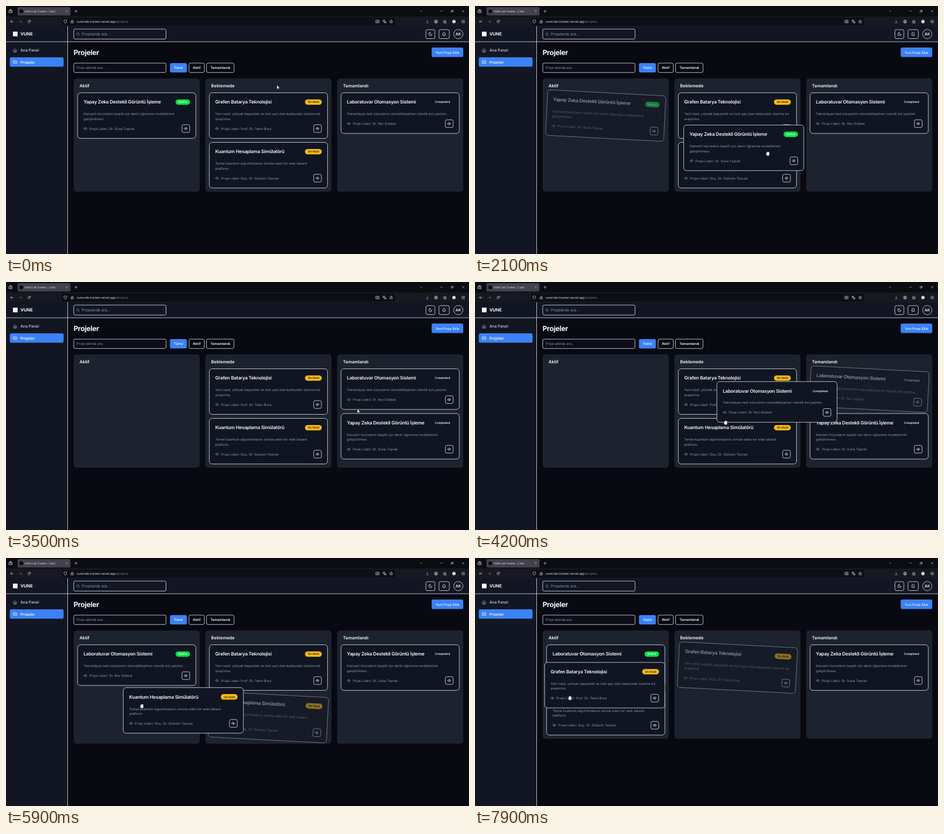
Write an HTML page that moves like this. It is 800 by 430 pixels and loops after 8000 ms.

```html
<!DOCTYPE html>
<html lang="tr">
<head>
<meta charset="utf-8">
<title>Projeler</title>
<style>
html, body { margin: 0; width: 100%; height: 100%; overflow: hidden; background: #090912; }
svg { display: block; width: 100%; height: 100%; }
text { font-family: Inter, sans-serif; text-rendering: geometricPrecision; white-space: pre; }
.ui { font-family: "Open Sans", sans-serif; }
.tight { letter-spacing: -.025em; }
</style>
</head>
<body>
<svg viewBox="0 0 800 430"><g id="page"></g><g id="board"></g></svg>
<script>
const LIGHT = '#f5f7fb', MUTED = '#8b96a9', LINE = '#dfe3ea', BLUE = '#3b82f6';
const PANEL = '#121623', CARD = '#111521', COLUMN = '#1d232e';

const ICONS = {
  eye: 'M2 12s3.6-7 10-7 10 7 10 7-3.6 7-10 7-10-7-10-7ZM15 12a3 3 0 1 1-6 0 3 3 0 0 1 6 0',
  moon: 'M12 3a6 6 0 0 0 9 9 9 9 0 1 1-9-9Z',
  bell: 'M6 8a6 6 0 0 1 12 0c0 7 3 9 3 9H3s3-2 3-9M10.3 21a2 2 0 0 0 3.4 0',
  home: 'm3 9 9-7 9 7v11a2 2 0 0 1-2 2H5a2 2 0 0 1-2-2zM9 22V12h6v10',
  folder: 'M4 20h16a2 2 0 0 0 2-2V8a2 2 0 0 0-2-2h-8l-2-3H4a2 2 0 0 0-2 2v13a2 2 0 0 0 2 2ZM8 10v4M12 10v2M16 10v6',
  search: 'M21 21l-4.3-4.3M19 11a8 8 0 1 1-16 0 8 8 0 0 1 16 0',
  back: 'M21 12H4M11 5l-7 7 7 7',
  forward: 'M3 12h17M13 5l7 7-7 7',
  reload: 'M20 12a8 8 0 1 1-3-6.2L20 8M20 2v6h-6',
  shield: 'M12 2l9 3c0 9-3 14-9 17-6-3-9-8-9-17z',
  lock: 'M5 11h14v10H5zM8 11V7a4 4 0 0 1 8 0v4',
  tabs: 'M3 9h18v12H3zM5 5h14M9 2h6M9 15h6',
  reader: 'M2 4h20v16H2zM12 7v10M8 12h8',
  translate: 'M2 5h12M8 2v3M12 5c-1 5-5 8-9 9M5 8c2 4 5 5 7 6M12 22l5-12 5 12M14 18h6',
  star: 'M12 2l3 7 7 .6-5.400 4.800 1.700 7.100L12 17.700 5.700 21.500l1.700-7.100L2 9.600 9 9z',
  download: 'M12 3v12M6 10l6 6 6-6M4 21h16',
  user: 'M22 12a10 10 0 1 1-20 0 10 10 0 0 1 20 0M16 10a4 4 0 1 1-8 0 4 4 0 0 1 8 0M6 19c2-4 10-4 12 0',
  puzzle: 'M4 8h5c-2-6 6-6 4 0h6v5c-6-2-6 6 0 4v4H4v-5c5 1 5-5 0-4z',
  menu: 'M3 5h18M3 12h18M3 19h18',
  down: 'M4 8l8 8 8-8',
  minus: 'M4 12h16',
  plus: 'M12 3v18M3 12h18',
  close: 'M4 4l16 16M20 4L4 20',
  restore: 'M4 8h12v12H4zM8 8V4h12v12h-4'
};

const rect = (x, y, w, h, r, fill, stroke = 'none') =>
  `<rect x="${x}" y="${y}" width="${w}" height="${h}" rx="${r}" fill="${fill}" stroke="${stroke}" stroke-width=".8"/>`;
const text = (x, y, size, str, fill = LIGHT, weight = 400, attrs = '') =>
  `<text x="${x}" y="${y}" font-size="${size}" fill="${fill}" font-weight="${weight}" ${attrs}>${str}</text>`;
const mid = 'text-anchor="middle"';
const icon = (name, cx, cy, size, color = LIGHT) =>
  `<path d="${ICONS[name]}" transform="translate(${cx - size / 2} ${cy - size / 2}) scale(${size / 24})" fill="none" stroke="${color}" stroke-width="2.2" stroke-linecap="round" stroke-linejoin="round"/>`;
const dot = (x, y, r, fill, stroke = 'none') =>
  `<circle cx="${x}" cy="${y}" r="${r}" fill="${fill}" stroke="${stroke}" stroke-width=".8"/>`;

function browser() {
  const bar = [['back', 10], ['forward', 25, '#777783'], ['reload', 40], ['shield', 102.5], ['lock', 114.5],
    ['reader', 642], ['translate', 654], ['star', 665.5], ['download', 728, '#4aa8f0'],
    ['user', 743], ['puzzle', 758.5], ['menu', 790]];
  const top = [['tabs', 8, 7], ['close', 105, 4], ['plus', 121, 6], ['down', 717.5, 5],
    ['minus', 752.5, 5], ['restore', 771, 5], ['close', 790, 5]];
  return rect(0, 0, 800, 18, 0, '#0c0c13') + rect(0, 18, 800, 17, 0, '#181821') +
    rect(20, 2, 91.5, 14.5, 2, '#42414d') + rect(97, 20, 575, 14, 2, '#0e0e16') +
    dot(26.5, 9.2, 3.2, '#08080c') +
    text(32, 11, 4.6, 'VUNE Lab Tracker | Canlı', LIGHT, 400, 'class="ui"') +
    text(122, 29, 5.35, 'vune-lab-tracker.vercel.app<tspan fill="#85858f">/projects</tspan>', LIGHT, 400, 'class="ui"') +
    top.map(([n, x, s]) => icon(n, x, 9, s)).join('') +
    bar.map(([n, x, c]) => icon(n, x, 27, 6.5, c)).join('') + dot(774, 27, 3, '#d4d4d8');
}

function shell() {
  const button = (x, w, label, fill, line) =>
    rect(x, 99, w, 16.3, 2.5, fill, line) + text(x + w / 2, 109.300, 5.83, label, LIGHT, 600, mid);
  return rect(0, 35, 800, 395, 0, '#090912') + rect(0, 35, 106.5, 395, 0, PANEL) + rect(106, 35, 694, 27, 0, PANEL) +
    rect(106, 35, .8, 395, 0, LINE) + rect(0, 61.6, 800, .8, 0, LINE) +
    rect(12, 44.5, 8, 8, 0, LIGHT) + text(25, 51.3, 7.5, 'VUNE', LIGHT, 700) +
    icon('home', 15.7, 77, 7, '#a9b2c2') + text(25, 79.4, 6.67, 'Ana Panel', '#d5dae3', 500) +
    rect(6.5, 89, 93, 16.3, 2.5, BLUE) + icon('folder', 15.7, 97, 7.5) + text(25, 99.5, 6.67, 'Projeler', LIGHT, 600) +
    rect(117, 40, 159.5, 17.3, 2.5, PANEL, LINE) + icon('search', 124.3, 48.700, 6.5, MUTED) +
    text(131, 51.2, 6.67, 'Projelerde ara...', MUTED) +
    rect(725.5, 41, 15.5, 15.5, 2.5, 'none', LINE) + icon('moon', 733.2, 48.7, 7.5) +
    rect(748, 41, 18, 15.5, 2.5, 'none', LINE) + icon('bell', 757, 48.7, 7.5) +
    dot(781.5, 48.7, 8, 'none', LINE) + text(781.5, 51.1, 6.67, 'AK', LIGHT, 600, mid) +
    text(116.7, 85, 12.3, 'Projeler', LIGHT, 700, 'class="tight"') +
    rect(735.5, 72, 54.5, 16.6, 2.5, BLUE) + text(762.8, 82.5, 5.83, 'Yeni Proje Ekle', LIGHT, 500, mid) +
    rect(117, 99, 159.5, 16.3, 2.5, '#0c0d17', LINE) + text(122, 109.3, 5.83, 'Proje adında ara...', MUTED) +
    button(283.3, 29.2, 'Tümü', BLUE) + button(316.2, 26.5, 'Aktif', 'none', LINE) +
    button(346.5, 47.5, 'Tamamlandı', 'none', LINE);
}

const CARDS = {
  vision: { h: 79, title: 'Yapay Zeka Destekli Görüntü İşleme', lead: 'Dr. Suna Toprak',
    lines: ['Kanserli hücrelerin tespiti için derin öğrenme modellerinin', 'geliştirilmesi.'] },
  battery: { h: 79, title: 'Grafen Batarya Teknolojisi', lead: 'Prof. Dr. Tekin Bora',
    lines: ['Yeni nesil, yüksek kapasiteli ve hızlı şarj olan bataryalar üzerine bir', 'araştırma.'] },
  quantum: { h: 79, title: 'Kuantum Hesaplama Simülatörü', lead: 'Doç. Dr. Gülsüm Tezcan',
    lines: ['Temel kuantum algoritmalarını simüle eden bir web tabanlı', 'platform.'] },
  lab: { h: 70.5, title: 'Laboratuvar Otomasyon Sistemi', lead: 'Dr. Nur Gökbel',
    lines: ['Tekrarlayan test süreçlerini otomatikleştiren robotik kol yazılımı.'] }
};
const COLUMNS = [['Aktif', 117], ['Beklemede', 344.6], ['Tamamlandı', 572.2]];
const BADGES = [['Active', 25, '#0be04b', '#f2fff5'], ['On Hold', 29, '#fbbc15', '#15130a'], ['Completed', 38, 'none', LIGHT]];

// Column contents from each moment on.
const BOARDS = [
  [0, ['vision'], ['battery', 'quantum'], ['lab']],
  [2440, [], ['battery', 'quantum'], ['lab', 'vision']],
  [4700, ['lab'], ['battery', 'quantum'], ['vision']],
  [6100, ['lab', 'quantum'], ['battery'], ['vision']]
];
const DRAGS = [
  { id: 'vision', grab: 1750, drop: 2440 },
  { id: 'lab', grab: 3600, drop: 4700 },
  { id: 'quantum', grab: 5450, drop: 6100 },
  { id: 'battery', grab: 7000, drop: 9000 }
];
// Pointer path: time, x, y.
const PATH = [
  [0, 468, 137], [900, 400, 172], [1400, 342, 204], [1700, 234, 192], [1750, 234, 192],
  [2350, 700, 302], [2700, 700, 302], [3400, 607, 220], [3600, 607, 220], [4200, 433, 244],
  [4640, 180, 290], [4900, 190, 290], [5100, 323.5, 284.5], [5350, 400, 270], [5450, 400, 270],
  [6000, 198, 254], [6300, 198, 254], [6900, 395, 212.5], [7000, 395, 212.5], [7100, 356, 207],
  [7800, 164, 243], [8000, 164, 243]
];
const LAG = 45, SETTLE = 250;

function pointer(t) {
  const i = Math.max(1, PATH.findIndex(p => p[0] >= t));
  const [t0, x0, y0] = PATH[i - 1], [t1, x1, y1] = PATH[i];
  const k = (t - t0) / (t1 - t0);
  return [x0 + (x1 - x0) * k, y0 + (y1 - y0) * k];
}

function layout(t) {
  const places = {};
  BOARDS.findLast(b => b[0] <= t).slice(1).forEach((ids, col) => {
    let y = 150.5;
    for (const id of ids) {
      places[id] = { x: COLUMNS[col][1] + 6.7, y, col };
      y += CARDS[id].h + 7;
    }
  });
  return places;
}

function card(id, { x, y, col }, w = 204.3, attrs = '') {
  const { h, title, lead, lines } = CARDS[id];
  const [label, bw, fill, ink] = BADGES[col];
  const bx = w - 10 - bw, foot = h - 17;
  return `<g transform="translate(${x} ${y})"><g ${attrs}>` + rect(0, 0, w, h, 5, CARD, LINE) +
    text(10.2, 18.900, 8.1, title, LIGHT, 600, 'class="tight"') +
    rect(bx, 11.4, bw, 9.4, 4.7, fill) + text(bx + bw / 2, 17.9, 5, label, ink, 600, mid) +
    lines.map((s, i) => text(10.2, 38.8 + i * 8.4, 5.8, s, MUTED)).join('') +
    icon('eye', 13.5, foot, 6.6, MUTED) + text(20.3, foot + 2.1, 5.8, 'Proje Lideri: ' + lead, MUTED) +
    rect(w - 24, foot - 6.7, 13.4, 13.4, 2.5, 'none', LINE) + icon('eye', w - 17.3, foot, 6.6) + '</g></g>';
}

function overlay({ id, grab, drop }, t) {
  const from = layout(grab)[id], [gx, gy] = pointer(grab);
  const [px, py] = pointer(Math.min(Math.max(t - LAG, grab), drop));
  const at = { x: from.x + px - gx, y: from.y + py - gy, col: from.col };
  if (t >= drop) {
    const to = layout(t)[id], k = 1 - (1 - (t - drop) / SETTLE) ** 2.4;
    at.x += (to.x - at.x) * k;
    at.y += (to.y - at.y) * k;
  }
  return card(id, at, 207.6);
}

function cursor(t, holding) {
  const [x, y] = pointer(t);
  const d = holding
    ? 'M-2.500-1.500q0-1.500 1.200-1.200 .4-1.200 1.500-.5 .8-.8 1.400.2 1.300-.3 1.300 1V.8Q2.900 2.200 2 3.600H-1.400L-3.200.8Q-3.500-.3-2.500 0Z'
    : 'M0 0V7.200L1.700 5.700 2.800 8.200 4 7.700 2.900 5.200H5.100Z';
  return `<path d="${d}" transform="translate(${x} ${y})" fill="#fff" stroke="#000" stroke-width=".5"/>`;
}

function draw(t) {
  const places = layout(t);
  const drag = DRAGS.find(d => t >= d.grab && t < d.drop + SETTLE);
  const holding = drag && t < drag.drop;
  const bottom = Math.max(...Object.entries(places).map(([id, p]) => p.y + CARDS[id].h)) + 6.5;
  let out = COLUMNS.map(([name, x]) =>
    rect(x, 125.5, 217.8, bottom - 125.5, 5, COLUMN) + text(x + 10, 140.8, 7.5, name, LIGHT, 600)).join('');
  for (const id in places) {
    const ghost = holding ? `opacity=".5" transform="rotate(3 102 ${CARDS[id].h / 2})"` : 'opacity=".4"';
    out += card(id, places[id], undefined, drag && drag.id === id ? ghost : '');
  }
  if (drag) out += overlay(drag, t);
  board.innerHTML = out + cursor(t, holding);
}

const board = document.getElementById('board');
document.getElementById('page').innerHTML = shell() + browser();
let shown = -1;
function tick() {
  // The screen refreshes ten times a second.
  const t = Math.floor(performance.now() % 8000 / 100) * 100;
  if (t !== shown) draw(shown = t);
  requestAnimationFrame(tick);
}
tick();
</script>
</body>
</html>
```
